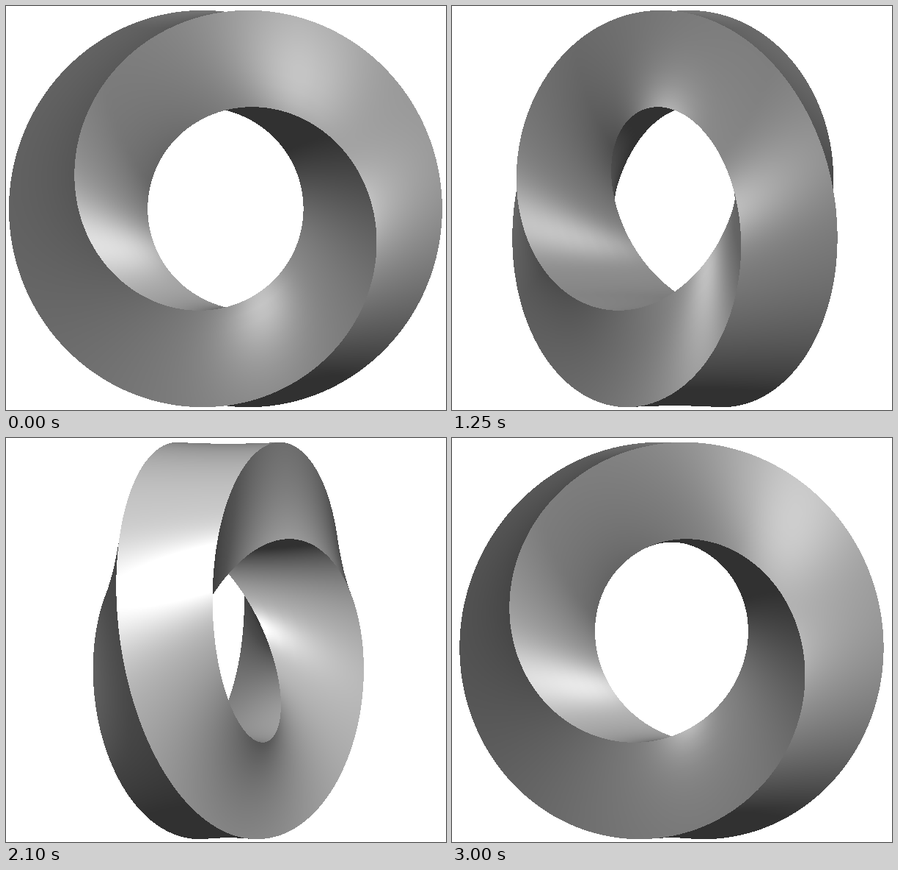
Animation of 600x549 px, one loop 3.05 s. Source, as an HTML page with a canvas:

```html
<!DOCTYPE html>
<html lang="en">
<head>
<meta charset="utf-8">
<title>Twisted square ring</title>
<style>
  html, body { margin: 0; width: 100%; height: 100%; overflow: hidden; background: #fff; }
  canvas { display: block; }
</style>
</head>
<body>
<canvas id="stage" width="600" height="549"></canvas>
<script>
const W = 600, H = 549;
const STEP = 50, FRAMES = 61;
const RING = 200.8, HALF = RING / 3;  // ring radius, half side of the square section
const AROUND = 240, ACROSS = 8;       // mesh cells per face
const CENTER_X = 302, CENTER_Y = 275.5, OFF_AXIS = 2.6;
const AMBIENT = 49, SHINE = 60;
const LAMP = [0.19, 0.43, 0.88];      // moves with the viewer
const SUN = [0.865, 0.43, -0.26];     // fixed to the ring

const ctx = document.getElementById('stage').getContext('2d');
const image = ctx.createImageData(W, H);
const pixels = new Uint32Array(image.data.buffer);
const depth = new Float32Array(W * H);

// Square section making half a turn on its way round the ring.
function buildMesh() {
  const verts = [], tris = [];
  for (let face = 0; face < 4; face++) {
    for (let i = 0; i <= AROUND; i++) {
      const a = i / AROUND * 2 * Math.PI;
      const phi = a / 2 + face * Math.PI / 2;
      const sa = Math.sin(a), ca = Math.cos(a);
      const sp = Math.sin(phi), cp = Math.cos(phi);
      for (let j = 0; j <= ACROSS; j++) {
        const v = HALF * (2 * j / ACROSS - 1);
        const r = RING + HALF * cp - v * sp;
        const tilt = v / 2 / r;
        const len = Math.hypot(1, tilt);
        const id = verts.length;
        verts.push({
          x: -sa * r, y: ca * r, z: HALF * sp + v * cp,
          nx: (-sa * cp - tilt * ca) / len,
          ny: (ca * cp - tilt * sa) / len,
          nz: sp / len
        });
        if (i < AROUND && j < ACROSS) {
          const next = id + ACROSS + 1;
          tris.push([id, id + 1, next], [id + 1, next + 1, next]);
        }
      }
    }
  }
  return { verts, tris };
}

const mesh = buildMesh();
const points = mesh.verts.map(() => ({ x: 0, y: 0, z: 0, g: 0 }));

function lit(nx, ny, nz, [lx, ly, lz], diffuse) {
  const d = nx * lx + ny * ly + nz * lz;
  if (d <= 0) return 0;
  const mirror = Math.max(0, 2 * d * nz - lz);
  return diffuse * d + SHINE * Math.min(1, 4 * d) * Math.pow(mirror, 10);
}

function fill(a, b, c) {
  const area = (b.x - a.x) * (c.y - a.y) - (b.y - a.y) * (c.x - a.x);
  if (Math.abs(area) < 1e-6) return;
  const x0 = Math.max(0, Math.ceil(Math.min(a.x, b.x, c.x) - 0.5));
  const x1 = Math.min(W - 1, Math.floor(Math.max(a.x, b.x, c.x) - 0.5));
  const y0 = Math.max(0, Math.ceil(Math.min(a.y, b.y, c.y) - 0.5));
  const y1 = Math.min(H - 1, Math.floor(Math.max(a.y, b.y, c.y) - 0.5));
  for (let y = y0; y <= y1; y++) {
    const py = y + 0.5;
    for (let x = x0; x <= x1; x++) {
      const px = x + 0.5;
      const wa = ((b.x - px) * (c.y - py) - (b.y - py) * (c.x - px)) / area;
      const wb = ((c.x - px) * (a.y - py) - (c.y - py) * (a.x - px)) / area;
      const wc = 1 - wa - wb;
      if (wa < -1e-6 || wb < -1e-6 || wc < -1e-6) continue;
      const z = wa * a.z + wb * b.z + wc * c.z;
      const at = y * W + x;
      if (z <= depth[at]) continue;
      depth[at] = z;
      const g = Math.min(255, Math.round(wa * a.g + wb * b.g + wc * c.g));
      pixels[at] = 0xff000000 | g * 0x010101;
    }
  }
}

function draw(turn) {
  const s = Math.sin(turn), c = Math.cos(turn);
  const cx = CENTER_X - OFF_AXIS * c;
  const sun = [SUN[0] * c + SUN[2] * s, SUN[1], SUN[2] * c - SUN[0] * s];
  pixels.fill(0xffffffff);
  depth.fill(-1e9);
  mesh.verts.forEach((v, i) => {
    const p = points[i];
    const nx = v.nx * c + v.nz * s, nz = v.nz * c - v.nx * s;
    p.x = cx + v.x * c + v.z * s;
    p.y = CENTER_Y - v.y;
    p.z = v.z * c - v.x * s;
    p.g = AMBIENT + lit(nx, v.ny, nz, LAMP, 92) + lit(nx, v.ny, nz, sun, 65);
  });
  for (const [a, b, d] of mesh.tris) fill(points[a], points[b], points[d]);
  ctx.putImageData(image, 0, 0);
}

let shown = -1;
function tick() {
  const n = Math.floor(performance.now() / STEP) % FRAMES;
  if (n !== shown) {
    shown = n;
    // The loop opens face-on, then jumps back two steps and turns evenly.
    const degrees = n === 0 ? 0 : 6 * n - 12;
    draw(degrees * Math.PI / 180);
  }
  requestAnimationFrame(tick);
}
tick();
</script>
</body>
</html>
```
